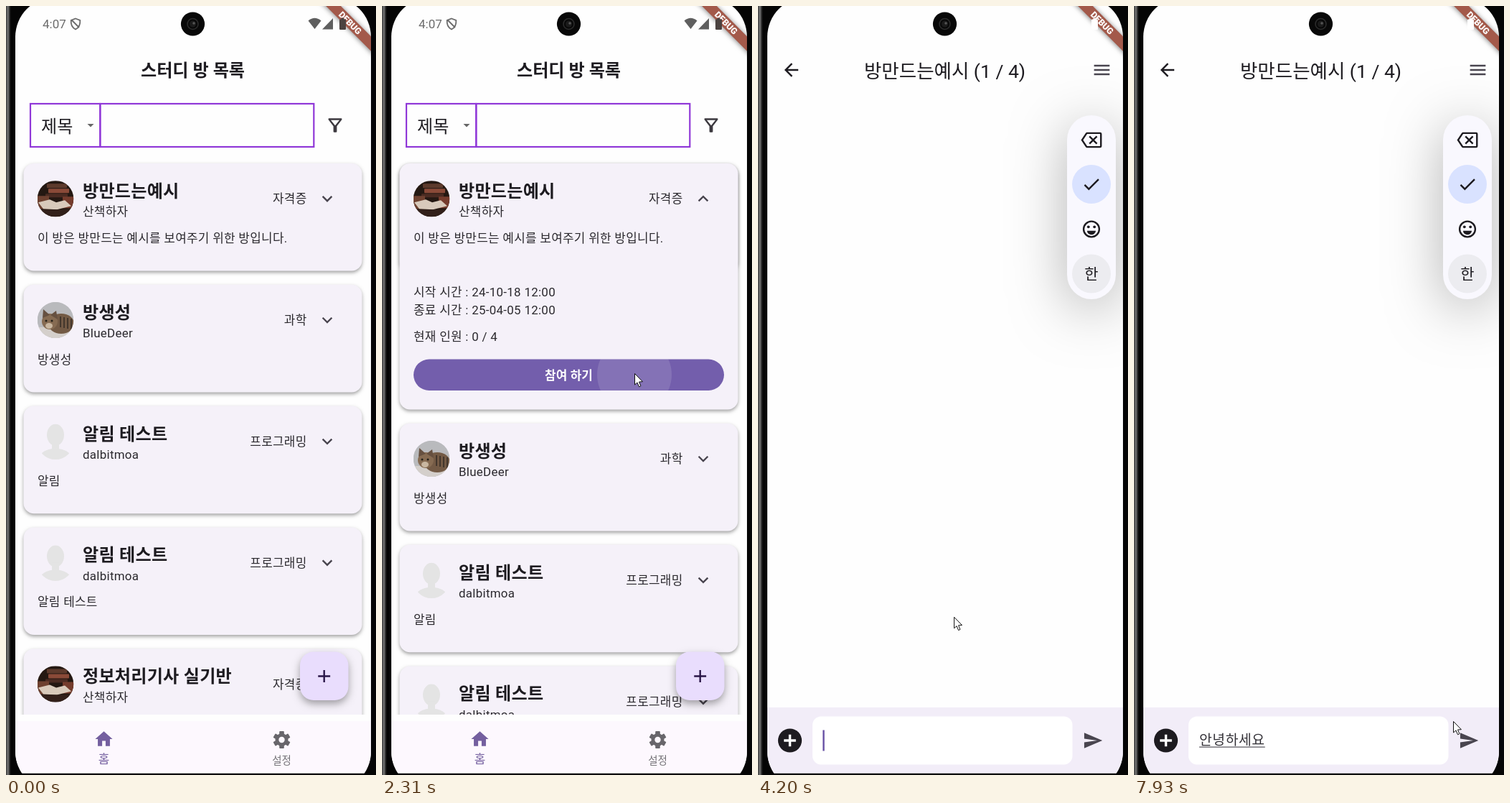
An HTML page with a canvas for the animation above (8 s loop, 516 by 1070 pixels).

```html
<!DOCTYPE html>
<html lang="ko">
<head>
<meta charset="utf-8">
<style>
html, body { margin: 0; width: 100%; height: 100%; overflow: hidden; background: #000; }
canvas { display: block; }
</style>
</head>
<body>
<canvas id="stage" width="516" height="1070"></canvas>
<script>
const c = document.getElementById('stage').getContext('2d');
const LOOP = 8000, DP = 1.206;
const INK = '#1d1b20', SOFT = '#49454f', PURPLE = '#6750a4';
const FONT = 'Roboto, "Noto Sans CJK KR", "Noto Sans CJK", sans-serif';

const ICON = {
  home: 'M10 20v-6h4v6h5v-8h3L12 3 2 12h3v8z',
  send: 'M2.01 21L23 12 2.01 3 2 10l15 2-15 2z',
  back: 'M20 11H7.83l5.59-5.59L12 4l-8 8 8 8 1.41-1.41L7.83 13H20v-2z',
  menu: 'M3 18h18v-2H3v2zm0-5h18v-2H3v2zm0-7v2h18V6H3z',
  more: 'M16.59 8.59L12 13.17 7.41 8.59 6 10l6 6 6-6z',
  add: 'M19 13h-6v6h-2v-6H5v-2h6V5h2v6h6v2z',
  filter: 'M7 6h10l-5 6.3zM4.25 5.6C6.3 8.2 10 13 10 13v6q0 1 1 1h2q1 0 1-1v-6s3.7-4.8 5.75-7.4Q20.4 4 19 4H5Q3.6 4 4.25 5.6z',
  check: 'M9 16.17L4.83 12l-1.42 1.41L9 19 21 7l-1.41-1.41z',
  erase: 'M22 3H7q-1 0-1.6.9L0 12l5.4 8.1Q6 21 7 21h15q2 0 2-2V5q0-2-2-2zm0 16H7.07L2.4 12l4.66-7H22zM10.41 17L14 13.41 17.59 17 19 15.59 15.41 12 19 8.41 17.59 7 14 10.59 10.41 7 9 8.41 12.59 12 9 15.59z'
};
for (const k in ICON) ICON[k] = new Path2D(ICON[k]);

const ROOMS = [
  ['방만드는예시', '산책하자', '자격증', '이 방은 방만드는 예시를 보여주기 위한 방입니다.', books],
  ['방생성', 'BlueDeer', '과학', '방생성', cat],
  ['알림 테스트', 'dalbitmoa', '프로그래밍', '알림', person],
  ['알림 테스트', 'dalbitmoa', '프로그래밍', '알림 테스트', person],
  ['정보처리기사 실기반', '산책하자', '자격증', '', books]
];

const POINTER = [
  [260, 499, 1058], [480, 470, 965], [650, 448, 850], [1010, 447, 317], [1080, 443, 288],
  [1560, 443, 288], [1700, 441, 302], [2230, 352, 511], [2980, 352, 511], [3220, 370, 660],
  [3560, 280, 960], [3720, 291, 989], [3940, 291, 989], [4530, 265, 787], [7520, 265, 787],
  [7620, 278, 744], [7930, 445, 995], [8000, 445, 995]
];

const TYPED = [
  [3880, ''], [4670, 'ㅗ'], [4730, 'ㅗㅑ'], [5000, 'ㅗ'], [5320, ''],
  [5930, 'ㅇ'], [6000, '아'], [6070, '안'], [6140, '안ㄴ'], [6260, '안녀'], [6330, '안녕'],
  [6530, '안녕ㅎ'], [6590, '안녕하'], [6730, '안녕핫'], [6790, '안녕하세'],
  [6930, '안녕하셍'], [7060, '안녕하세요']
];

const clamp = v => Math.max(0, Math.min(1, v));
const span = (t, a, b) => clamp((t - a) / (b - a));

function text(s, x, y, size, color = INK, weight = 400, align = 'left', spacing = 0) {
  c.font = `${weight} ${size}px ${FONT}`;
  c.textAlign = align;
  c.letterSpacing = spacing + 'px';
  c.fillStyle = color;
  c.fillText(s, x, y);
}
const body = (s, x, y, align) => text(s, x, y, 16.9, '#2b292e', 400, align, .3);

function box(x, y, w, h, r, color) {
  c.fillStyle = color;
  c.beginPath();
  c.roundRect(x, y, w, h, r);
  c.fill();
}
function disc(x, y, r, color) {
  c.fillStyle = color;
  c.beginPath();
  c.arc(x, y, r, 0, 7);
  c.fill();
}
function poly(color, ...p) {
  c.fillStyle = color;
  c.beginPath();
  for (let i = 0; i < p.length; i += 2) c.lineTo(p[i], p[i + 1]);
  c.closePath();
  c.fill();
}
function oval(x, y, rx, ry, color) {
  c.fillStyle = color;
  c.beginPath();
  c.ellipse(x, y, rx, ry, 0, 0, 7);
  c.fill();
}
function at(x, y, draw, turn = 0, scale = 1) {
  c.save();
  c.translate(x, y);
  c.rotate(turn);
  c.scale(scale, scale);
  draw();
  c.restore();
}
function icon(name, x, y, color, turn = 0, scale = DP) {
  at(x, y, () => {
    c.translate(-12, -12);
    c.fillStyle = color;
    c.fill(ICON[name], 'evenodd');
  }, turn, scale);
}
function shadowed(color, blur, dy, draw) {
  c.save();
  c.shadowColor = color;
  c.shadowBlur = blur;
  c.shadowOffsetY = dy;
  draw();
  c.restore();
}

// Avatars, drawn around 0,0 inside a circle of radius 25
function books() {
  box(-25, -25, 50, 50, 0, '#241812');
  box(-12, -21, 28, 6, 1, '#5d3a2c');
  box(-10, -14, 29, 6, 1, '#8a4a38');
  box(-14, -7, 31, 5, 1, '#4b2b22');
  box(-25, -4, 16, 18, 0, '#6e4130');
  box(10, -3, 16, 16, 0, '#753c2d');
  poly('#d8cabb', -24, 5, -8, 1, 1, 5, 13, 2, 22, 10, 2, 15, -17, 14);
  box(-25, 15, 50, 10, 0, '#32201a');
}
function cat() {
  box(-25, -25, 50, 50, 0, '#b9babd');
  box(-25, 10, 50, 15, 0, '#d4cfcb');
  oval(8, 5, 18, 14, '#735a45');
  oval(-8, 2, 11, 11, '#866b52');
  poly('#665040', -18, -3, -17, -15, -8, -7);
  poly('#665040', -7, -7, 1, -13, 3, -1);
  oval(-9, 8, 5, 4, '#c9b7a1');
  c.fillStyle = '#43362c';
  for (let i = 0; i < 4; i++) c.fillRect(6 + i * 5, -5 + i, 2, 15);
  disc(-13, 1, 1.5, '#242019');
  disc(-5, 1, 1.5, '#242019');
}
function person() {
  oval(0, -9, 12, 15, '#e4e4e4');
  box(-5, 0, 10, 16, 0, '#e4e4e4');
  oval(0, 23, 22, 13, '#e4e4e4');
}
function avatar(x, y, draw) {
  at(x, y, () => {
    c.beginPath();
    c.arc(0, 0, 25.3, 0, 7);
    c.clip();
    draw();
  });
}

function card(room, y, extra, open) {
  const [name, owner, topic, about, face] = room;
  shadowed('rgba(0,0,0,.36)', 5, 2.5, () => box(24.5, y, 472, 149.6, 14.5, '#f5f1f9'));
  if (extra) shadowed('rgba(0,0,0,.36)', 5, 2.5, () => box(24.5, y, 472, 149.6 + extra, 14.5, '#f5f1f9'));
  avatar(69, y + 49.2, face);
  text(name, 107, y + 47, 24.1, INK, 700, 'left', .25);
  body(owner, 107, y + 73.3);
  body(topic, 419.5, y + 55.4, 'right');
  icon('more', 448, y + 49.2, SOFT, open * Math.PI);
  body(about, 44, y + 110);
}

function details(t, y, height) {
  c.save();
  c.beginPath();
  c.rect(24, y, 473, height);
  c.clip();
  body('시작 시간 : 24-10-18 12:00', 44, 403.5);
  body('종료 시간 : 25-04-05 12:00', 44, 429);
  body('현재 인원 : 0 / 4', 44, 466);
  box(44, 491.5, 433, 43.5, 21.75, t > 2210 ? '#735eac' : PURPLE);
  const wave = span(t, 2290, 2500);
  if (wave) {
    c.beginPath();
    c.roundRect(44, 491.5, 433, 43.5, 21.75);
    c.clip();
    disc(352, 513, 20 + 320 * wave, 'rgba(255,255,255,.12)');
  }
  text('참여 하기', 260.5, 519.5, 16.9, '#fff', 700, 'center', .1);
  c.restore();
}

function gear(x, y, color) {
  at(x, y, () => {
    for (let i = 0; i < 6; i++) {
      c.rotate(Math.PI / 3);
      box(-3.3, -12, 6.6, 8, 1, color);
    }
    disc(0, 0, 9, color);
    disc(0, 0, 4.2, '#fdf8fe');
  });
}

function listPage(t, pointer) {
  text('스터디 방 목록', 260.5, 98, 24.1, INK, 700, 'center');
  c.strokeStyle = '#9038d8';
  c.lineWidth = 2.2;
  c.strokeRect(34, 136, 97.3, 60);
  c.strokeRect(131.3, 136, 298, 60);
  text('제목', 49, 175.5, 24.1);
  poly('#666', 113.5, 164, 122.5, 164, 118, 168.5);
  icon('filter', 459, 166, '#3c393f');

  c.save();
  c.beginPath();
  c.rect(13, 200, 496, 786);
  c.clip();
  const open = span(t, 1130, 1350), extra = 193 * open * open;
  ROOMS.forEach((room, i) =>
    card(room, 219 + i * 168.8 + (i && extra), i ? 0 : extra, i ? 0 : open));
  if (extra) details(t, 340, 28.7 + extra);
  const ripple = span(t, 1080, 1200);
  if (ripple && t < 1400)
    disc(448, 268, 24 * ripple, `rgba(73,69,79,${.14 * (1 - span(t, 1250, 1400))})`);
  c.restore();

  box(13, 995, 496, 75, 0, '#fdf8fe');
  icon('home', 136.5, 1020, '#745f9f');
  text('홈', 136.5, 1054, 16.9, '#745f9f', 400, 'center');
  gear(384.5, 1021, '#68666b');
  text('설정', 384.5, 1054.5, 14.5, '#747277', 400, 'center');

  const hover = pointer && pointer[0] > 410 && pointer[0] < 477 && pointer[1] > 898 && pointer[1] < 966;
  shadowed('rgba(0,0,0,.35)', 11, 5, () => box(410, 898.5, 67.5, 67.5, 19, hover ? '#dccff2' : '#e9ddfd'));
  icon('add', 443.7, 932.5, '#2a1648');
}

function keyPanel() {
  shadowed('rgba(0,0,0,.3)', 75, 14, () => box(431, 152, 68, 256, 34, '#f9f8fe'));
  icon('erase', 465, 186.5, INK);
  disc(465, 248, 27, '#d9e2ff');
  icon('check', 465, 248, INK);
  c.strokeStyle = INK;
  c.lineWidth = 2.4;
  c.beginPath();
  c.arc(465, 310.5, 10.9, 0, 7);
  c.stroke();
  disc(460.8, 307.3, 1.9, INK);
  disc(469.2, 307.3, 1.9, INK);
  c.fillStyle = INK;
  c.beginPath();
  c.arc(465, 312, 6.2, .12, Math.PI - .12);
  c.fill();
  disc(465, 372.5, 27, '#ececf0');
  text('한', 465, 380, 21, INK, 500, 'center');
}

function message(t) {
  const typed = TYPED.findLast(e => e[0] <= t);
  if (!typed) return;
  const [since, words] = typed;
  text(words, 91, 1028, 19.3, '#343238', 400, 'left', .6);
  const width = words.length * 18.35;
  c.fillStyle = '#55525a';
  if (t < 5130 || t >= 5320) c.fillRect(91, 1030.5, width, 1.2);
  c.fillStyle = PURPLE;
  if ((t - since) % 1080 < 540) c.fillRect(90.3 + width - (words ? 1 : 0), 1007.5, 2.4, 29);
}

// The chat page settles from slightly under full size
function settle(t) {
  if (t < 2510 || t >= 2580) return;
  c.translate(261, 535);
  c.scale(.9977, .9977);
  c.translate(-261, -535);
}

function chatPage(t) {
  c.save();
  settle(t);
  icon('back', 46.5, 89, INK);
  text(`방만드는예시 (${t < 2720 ? 0 : 1} / 4)`, 260.5, 99.5, 26.5, INK, 400, 'center');
  icon('menu', 479.5, 89, SOFT);
  if (t < 2720) {
    const from = -Math.PI / 2, sweep = .2 + 4 * span(t, 2580, 2900);
    c.strokeStyle = '#6c6970';
    c.lineWidth = 4.8;
    c.beginPath();
    c.arc(260.5, 547, 19.5, from - .1, from - .1 + sweep);
    c.stroke();
  }
  box(12, 976, 498, 94, 0, '#f2edf8');
  disc(44.5, 1022, 16.6, INK);
  box(36.2, 1020.3, 16.6, 3.4, 0, '#fff');
  box(42.8, 1013.7, 3.4, 16.6, 0, '#fff');
  box(76, 988.5, 362.5, 67, 12, '#fff');
  icon('send', 467, 1022, SOFT);
  c.restore();
  message(t);
  if (t >= 4200) keyPanel();
}

function status() {
  text('4:07', 51, 31, 17, '#6b6b6b');
  c.strokeStyle = '#6b6b6b';
  c.lineWidth = 1.8;
  c.beginPath();
  c.moveTo(97, 17.5);
  c.lineTo(103.3, 20);
  c.quadraticCurveTo(104, 29, 97, 32.5);
  c.quadraticCurveTo(90, 29, 90.7, 20);
  c.closePath();
  c.moveTo(92, 20);
  c.lineTo(102, 30);
  c.stroke();
  c.fillStyle = '#5f5f5f';
  c.beginPath();
  c.moveTo(430.5, 32);
  c.lineTo(421.5, 20.5);
  c.quadraticCurveTo(430.5, 13, 439.5, 20.5);
  c.fill();
  poly('#5f5f5f', 441, 32.5, 456, 32.5, 456, 17);
}

function ribbon(battery) {
  at(480, 23.5, () => {
    shadowed('rgba(0,0,0,.5)', 7, 1, () => box(-60, -7.3, 120, 14.6, 0, '#a3594a'));
    text('DEBUG', 0, 4.4, 12.3, '#fff', 900, 'center');
  }, Math.PI / 4);
  box(465, 18.5, 9, 14.5, 1.2, battery);
  box(467.5, 16.8, 4, 2.5, 0, battery);
}

function bezel() {
  const edge = c.createLinearGradient(0, 0, 7, 0);
  edge.addColorStop(0, '#3a3a3a');
  edge.addColorStop(.4, '#777');
  edge.addColorStop(.75, '#222');
  edge.addColorStop(1, '#050505');
  box(0, 0, 516, 1070, 0, '#050505');
  c.fillStyle = edge;
  c.fillRect(0, 0, 7, 1070);
}

function camera() {
  disc(260.5, 25, 16.6, '#080808');
  c.strokeStyle = '#2c2c2c';
  c.lineWidth = 1.6;
  c.beginPath();
  c.arc(260.5, 25, 7.5, 0, 7);
  c.stroke();
  disc(260.5, 25, 4.5, '#1b1b1b');
  disc(262, 24, 1.8, '#555');
}

function pointerAt(t) {
  const i = POINTER.findIndex(p => p[0] > t);
  if (i < 1) return null;
  const [a, b] = [POINTER[i - 1], POINTER[i]], k = span(t, a[0], b[0]);
  return [1, 2].map(n => a[n] + (b[n] - a[n]) * k * (2 - k));
}
function drawPointer([x, y]) {
  at(x + .5, y + .5, () => {
    poly('#fff', 0, 0, 0, 15.5, 3.5, 12.4, 6, 18.3, 8.4, 17.2, 6, 11.5, 10.9, 11.2);
    c.strokeStyle = '#111';
    c.lineWidth = 1;
    c.stroke();
  });
}

function clipScreen(t) {
  settle(t);
  c.beginPath();
  c.rect(0, 0, 516, 1067.5);
  c.clip();
  c.beginPath();
  c.roundRect(13, -12, 496, 1104, 55);
  c.clip();
  c.resetTransform();
}

function render(t) {
  const chat = t >= 2510, pointer = pointerAt(t);
  bezel();
  c.save();
  clipScreen(t);
  box(13, -12, 496, 1092, 0, '#fefefe');
  if (chat) chatPage(t);
  else listPage(t, pointer);
  if (t < 2580) status();
  ribbon(t < 2580 ? '#4b4240' : '#fff');
  c.restore();
  camera();
  if (pointer) drawPointer(pointer);
}

function tick() {
  render(performance.now() % LOOP);
  requestAnimationFrame(tick);
}
tick();
</script>
</body>
</html>
```
